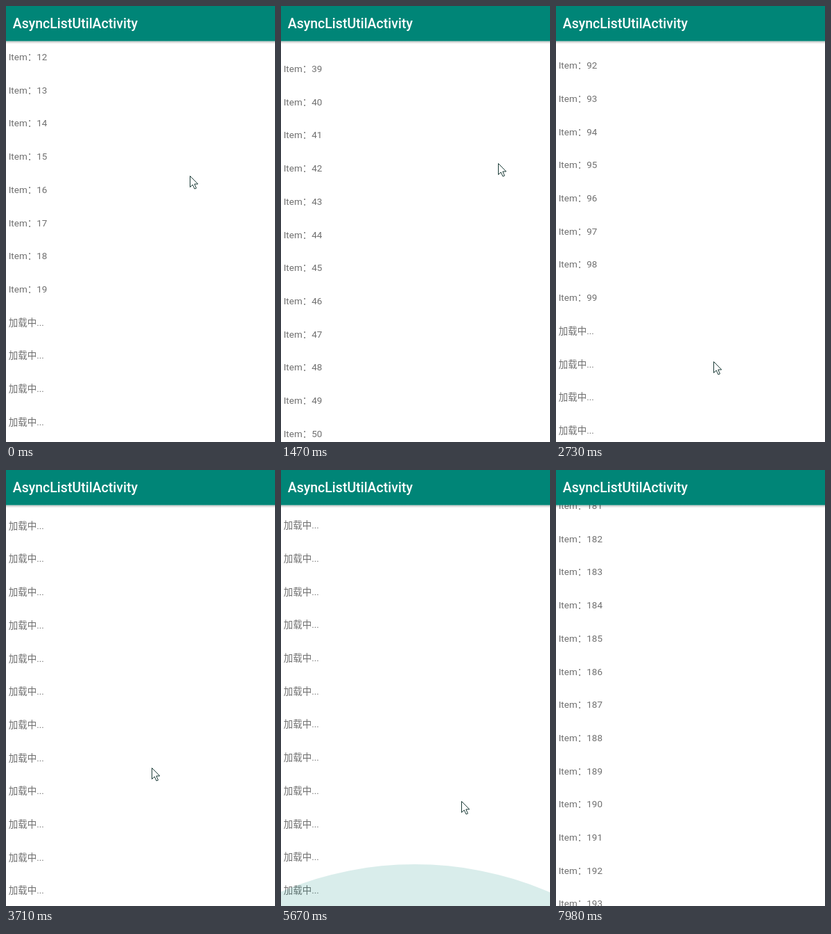
Animation of 388 by 627 pixels, one loop 8000 ms. Source, as an HTML page with a canvas:

```html
<!DOCTYPE html>
<html lang="zh-CN">
<head>
<meta charset="utf-8">
<title>AsyncListUtilActivity</title>
<style>
  html, body { margin: 0; width: 100%; height: 100%; overflow: hidden; background: #fff; }
  canvas { display: block; }
</style>
</head>
<body>
<canvas id="stage" width="388" height="627"></canvas>
<script>
const WIDTH = 388, HEIGHT = 627, LOOP = 8000, STEP = 70;
const HEADER = 50.5, ROW = 47.7, FIRST_BASELINE = 78;
const LAST_ITEM = 199, TILE = 20, ROWS_IN_VIEW = 11.6;
const START_ROW = 12, END_ROW = 187.87;
const FLING_MS = 1505, RETURN_MS = 513, LOAD_MS = 780;
const TEAL = '#008577';
const ctx = document.getElementById('stage').getContext('2d');

// The pointer drags from low to high between press and release;
// the list then coasts on by a number of rows.
const swipes = [
  { press: 0, release: 0, low: { x: 265, y: 244 }, high: { x: 265, y: 244 }, coast: 20.69 },
  { press: 1190, release: 1470, low: { x: 250, y: 519 }, high: { x: 313, y: 226 }, coast: 53.33 },
  { press: 3220, release: 3500, low: { x: 227, y: 511 }, high: { x: 347, y: 14 }, coast: 48.13 },
  { press: 4900, release: 5180, low: { x: 196, y: 536 }, high: { x: 370, y: 7 }, coast: 48 }
];
const pullBack = { start: 7560, end: 7980, rows: 6.41 };
const exit = { start: 5700, end: 6790, from: { x: 260, y: 476 }, to: { x: 334, y: 630 } };
const glow = { grow: 5480, hold: 5650, fade: 5740, end: 6300 };

const mix = (a, b, u) => a + (b - a) * u;
const progress = (time, start, end) =>
  end > start ? Math.min(1, Math.max(0, (time - start) / (end - start))) : 1;
const easeOut = (u, power = 3) => 1 - (1 - u) ** power;

function topRow(time) {
  let row = START_ROW;
  swipes.forEach(({ press, release, low, high, coast }, i) => {
    if (time < press) return;
    const next = swipes[i + 1];
    const flingTime = next ? Math.min(time, next.press) : time;
    row += (low.y - high.y) / ROW * progress(time, press, release);
    row += coast * easeOut(progress(flingTime, release, release + FLING_MS));
  });
  return Math.min(row, END_ROW) - pullBack.rows * progress(time, pullBack.start, pullBack.end);
}

// A tile of items appears a fixed delay after it first scrolls into view.
const loadTimes = [];
for (let time = 0; time < LOOP; time += STEP) {
  while (loadTimes.length * TILE <= Math.min(LAST_ITEM, topRow(time) + ROWS_IN_VIEW)) {
    loadTimes.push(loadTimes.length ? time + LOAD_MS : 0);
  }
}

function cursorAt(time) {
  if (time >= exit.start) {
    const u = progress(time, exit.start, exit.end);
    return { x: mix(exit.from.x, exit.to.x, easeOut(u)), y: mix(exit.from.y, exit.to.y, u ** 2.4) };
  }
  const index = swipes.findLastIndex(swipe => time >= swipe.press);
  const { press, release, low, high } = swipes[index];
  if (time < release) {
    const u = progress(time, press, release);
    return { x: mix(low.x, high.x, u), y: mix(low.y, high.y, u) };
  }
  const target = swipes[index + 1]?.low ?? exit.from;
  const u = progress(time, release, release + RETURN_MS);
  return { x: mix(high.x, target.x, easeOut(u, 4.5)), y: mix(high.y, target.y, easeOut(u)) };
}

function drawRows(time) {
  const top = topRow(time);
  ctx.font = '13.5px Roboto, "Noto Sans CJK SC", "Noto Sans CJK", sans-serif';
  ctx.fillStyle = '#707070';
  for (let item = Math.floor(top) - 1; item <= Math.min(LAST_ITEM, top + 13); item++) {
    const loaded = time >= loadTimes[Math.floor(item / TILE)];
    const y = Math.round(FIRST_BASELINE + (item - top) * ROW);
    ctx.fillText(loaded ? 'Item：' + item : '加载中...', 3.7, y);
  }
}

function drawGlow(time) {
  const level = easeOut(progress(time, glow.grow, glow.hold), 2)
    * (1 - progress(time, glow.fade, glow.end));
  if (level <= 0) return;
  const radius = 490;
  ctx.globalAlpha = 0.15 * level;
  ctx.fillStyle = TEAL;
  ctx.beginPath();
  ctx.arc(WIDTH / 2 - 1, HEIGHT - 60 * level + radius, radius, 0, Math.PI * 2);
  ctx.fill();
  ctx.globalAlpha = 1;
}

function drawHeader() {
  const shadow = ctx.createLinearGradient(0, HEADER, 0, HEADER + 4);
  shadow.addColorStop(0, 'rgba(0,0,0,.24)');
  shadow.addColorStop(1, 'rgba(0,0,0,0)');
  ctx.fillStyle = shadow;
  ctx.fillRect(0, HEADER, WIDTH, 4);
  ctx.fillStyle = TEAL;
  ctx.fillRect(0, 0, WIDTH, HEADER);
  ctx.font = '500 19.5px Roboto, sans-serif';
  ctx.fillStyle = '#fff';
  ctx.fillText('AsyncListUtilActivity', 9.7, 32);
}

function drawCursor(time) {
  if (time >= exit.end) return;
  const { x, y } = cursorAt(time);
  const arrow = new Path2D('M0 0V16L3.7 12.5L6.5 18.5L9 17.5L6.3 11.5H11.3Z');
  ctx.save();
  ctx.translate(Math.round(x) + 0.5, Math.round(y) + 0.5);
  ctx.fillStyle = '#fff';
  ctx.strokeStyle = '#1a3a36';
  ctx.fill(arrow);
  ctx.stroke(arrow);
  ctx.restore();
}

function draw(now) {
  const time = Math.floor((now % LOOP) / STEP) * STEP;
  ctx.fillStyle = '#fff';
  ctx.fillRect(0, 0, WIDTH, HEIGHT);
  drawRows(time);
  drawGlow(time);
  drawHeader();
  drawCursor(time);
}

const start = performance.now();
function tick() {
  draw(performance.now() - start);
  requestAnimationFrame(tick);
}
tick();
</script>
</body>
</html>
```
